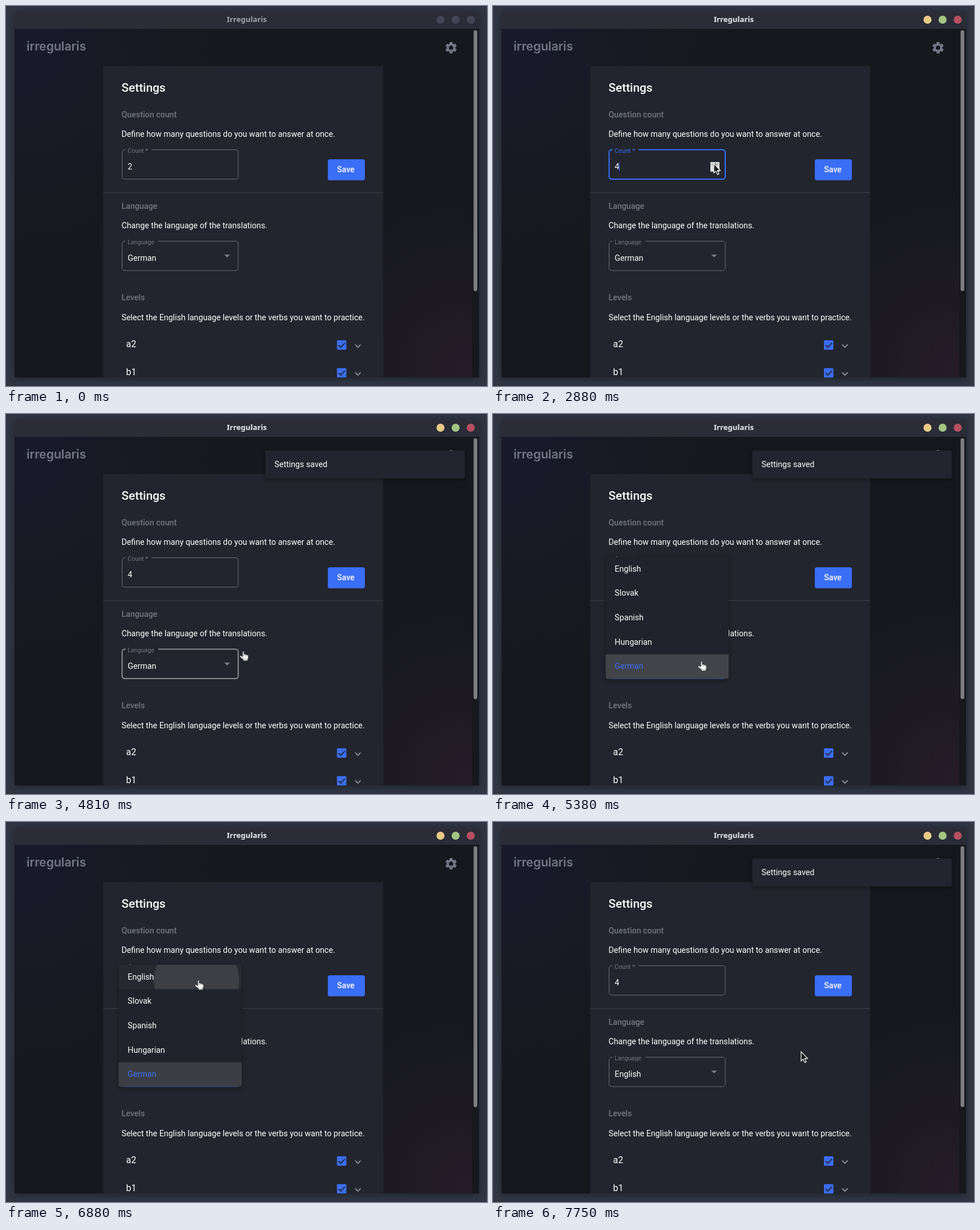
An HTML page that plays this animation: 843x665 px, repeating every 8 s.

```html
<!DOCTYPE html>
<html lang="en">
<head>
<meta charset="utf-8">
<title>Irregularis</title>
<style>
html, body { margin: 0; width: 100%; height: 100%; overflow: hidden; background: #2f3642; }
svg { display: block; width: 843px; height: 665px; font: 14.22px Roboto, sans-serif; fill: #fff; }
.head { font-weight: 500; fill: #737683; }
.small { font-size: 10.67px; fill: #737681; }
.line { fill: none; stroke: #6d7079; }
.thick { fill: none; stroke: #e8e8ea; stroke-width: 2; opacity: 0; }
.level { font-size: 16px; }
.pop { filter: drop-shadow(0 2px 3px rgba(0, 0, 0, .35)); }

/* One loop is 8 s, so 1% is 80 ms. */
.run, .thick { animation: 8s linear infinite; }
.hard { animation: 8s step-end infinite; }

#pointer { animation-name: move; }
@keyframes move {
  0%, 13.6% { transform: translate(291px, 15px); }
  18.75% { transform: translate(365px, 245px); }
  20.375% { transform: translate(378px, 264px); }
  23.5%, 38.4% { transform: translate(387px, 276px); }
  43.75%, 48.75% { transform: translate(588px, 285px); }
  57.9%, 58.75% { transform: translate(422px, 408px); }
  60.1% { transform: translate(414px, 415px); }
  63.75%, 72.75% { transform: translate(363px, 433px); }
  76.6%, 79% { transform: translate(340px, 351px); }
  82.9%, 90.6% { transform: translate(335px, 277px); }
  94.5% { transform: translate(533px, 393px); }
  96.9%, 100% { transform: translate(540px, 402px); }
}
#arrow { animation-name: arrow; }
@keyframes arrow {
  0%, 42.75%, 59.75% { opacity: 0; }
  11.75%, 50.75%, 91.5%, 100% { opacity: 1; }
}
#hand { animation-name: hand; }
@keyframes hand {
  0%, 50.75%, 91.5%, 100% { opacity: 0; }
  42.75%, 59.75% { opacity: 1; }
}

#active { animation-name: activate; }
@keyframes activate { 0%, 25% { opacity: 0; } 27.5%, 100% { opacity: 1; } }

#two { animation-name: two; }
@keyframes two { 0% { opacity: 1; } 25.75%, 100% { opacity: 0; } }
#three { animation-name: three; }
@keyframes three { 0%, 35.125%, 100% { opacity: 0; } 25.75% { opacity: 1; } }
#four { animation-name: four; }
@keyframes four { 0% { opacity: 0; } 35.125%, 100% { opacity: 1; } }
#caret { animation-name: caret; }
@keyframes caret { 0%, 32%, 41.4%, 100% { opacity: 0; } 25.75%, 35.125% { opacity: 1; } }
#spin { animation-name: spin; }
@keyframes spin { 0%, 39.9%, 92.2%, 100% { opacity: 0; } 21.9%, 88.25% { opacity: 1; } }

#countLine { animation-name: countLine; }
@keyframes countLine {
  0%, 18.6% { opacity: 0; stroke: #e8e8ea; }
  20.2%, 25% { opacity: 1; stroke: #e8e8ea; }
  25.75%, 44.5% { opacity: 1; stroke: #3b6ef6; }
  48.25% { opacity: 0; stroke: #3b6ef6; }
  48.3%, 88.25% { opacity: 0; stroke: #e8e8ea; }
  90.6%, 92.2% { opacity: 1; stroke: #e8e8ea; }
  95%, 100% { opacity: 0; stroke: #e8e8ea; }
}
#langLine { animation-name: langLine; }
@keyframes langLine {
  0%, 59.4% { opacity: 0; stroke: #e8e8ea; }
  60.1% { opacity: .4; stroke: #e8e8ea; }
  62%, 64% { opacity: 1; stroke: #e8e8ea; }
  64.8%, 93% { opacity: 1; stroke: #3b6ef6; }
  96.1%, 100% { opacity: 0; stroke: #3b6ef6; }
}
#countLabel { animation-name: countLabel; }
@keyframes countLabel { 0%, 44.5%, 100% { fill: #737681; } 25.75% { fill: #3b6ef6; } }
#langLabel { animation-name: langLabel; }
@keyframes langLabel { 0%, 93%, 100% { fill: #737681; } 64.1% { fill: #3b6ef6; } }

#before { animation-name: before; }
@keyframes before { 0% { opacity: 1; } 87.5%, 100% { opacity: 0; } }
#after { animation-name: after; }
@keyframes after { 0% { opacity: 0; } 87.5%, 100% { opacity: 1; } }

#menu { transform-origin: 305px 441px; animation-name: menu; }
@keyframes menu {
  0%, 64.9% { opacity: 0; transform: scaleY(.8); animation-timing-function: cubic-bezier(0, 0, .2, 1); }
  66.4%, 87.4% { opacity: 1; transform: none; }
  88.6%, 100% { opacity: 0; transform: none; }
}
#hover { animation-name: hover; }
@keyframes hover {
  0% { transform: translateY(171px); }
  73.3% { transform: translateY(128px); }
  75% { transform: translateY(85.3px); }
  80% { transform: translateY(42.7px); }
  82.2%, 100% { transform: none; }
}
#ripple { transform-origin: 334px 277px; animation-name: ripple; }
@keyframes ripple {
  0%, 85.2% { transform: scale(0); }
  86% { transform: scale(.48); animation-timing-function: ease-out; }
  91%, 100% { transform: none; }
}

#toast { transform-origin: 629px 88px; animation-name: toast; }
@keyframes toast {
  0%, 47.75% { opacity: 0; transform: scale(.8); animation-timing-function: cubic-bezier(0, 0, .2, 1); }
  49.6%, 80.25% { opacity: 1; transform: none; }
  81.5% { opacity: 0; transform: none; }
  81.6%, 90.6% { opacity: 0; transform: scale(.8); animation-timing-function: cubic-bezier(0, 0, .2, 1); }
  92.5%, 100% { opacity: 1; transform: none; }
}
</style>
</head>
<body>
<svg viewBox="0 0 843 665">
  <defs>
    <radialGradient id="blue" gradientUnits="userSpaceOnUse" cx="30" cy="80" r="380">
      <stop offset="0" stop-color="#191a2b"/>
      <stop offset="1" stop-color="#191a2b" stop-opacity="0"/>
    </radialGradient>
    <radialGradient id="plum" gradientUnits="userSpaceOnUse" cx="800" cy="630" r="300">
      <stop offset="0" stop-color="#241c29"/>
      <stop offset="1" stop-color="#241c29" stop-opacity="0"/>
    </radialGradient>
    <clipPath id="page"><rect x="15" y="40" width="814" height="610"/></clipPath>
    <clipPath id="option"><path d="M197.500 292.500V254a4 4 0 0 1 4-4H409a4 4 0 0 1 4 4V292.500Z"/></clipPath>
    <path id="box" d="M255 251.500H402.500a4.500 4.500 0 0 1 4.500 4.500V298.500a4.500 4.500 0 0 1-4.500 4.500H208a4.500 4.500 0 0 1-4.500-4.500V256a4.500 4.500 0 0 1 4.500-4.500H209.500"/>
    <path id="wideBox" d="M267 411.500H402.500a4.500 4.500 0 0 1 4.500 4.500V458.500a4.500 4.500 0 0 1-4.500 4.500H208a4.500 4.500 0 0 1-4.500-4.500V416a4.500 4.500 0 0 1 4.500-4.500H209.500"/>
    <g id="row">
      <rect x="580" y="585" width="16.500" height="16.500" rx="1.500" fill="#3b6ef6"/>
      <path d="M583 593.500l3.700 3.700 7.300-7.600" fill="none" stroke="#20232b" stroke-width="1.900"/>
      <path d="M612 592.500l4.800 4.800 4.800-4.800" fill="none" stroke="#868890" stroke-width="2"/>
    </g>
  </defs>

  <rect width="843" height="665" fill="#2f3642"/>
  <g style="filter: drop-shadow(0 2px 6px rgba(0, 0, 0, .35))">
    <path d="M15 650V14a4 4 0 0 1 4-4H825a4 4 0 0 1 4 4V650Z" fill="#2a2d36"/>
  </g>
  <g font-family="Noto Sans, sans-serif" font-size="13.200" font-weight="600" text-anchor="middle">
    <text x="422" y="28.300" fill="#a2a5ad">Irregularis</text>
    <g fill="#444655"><circle cx="761.500" cy="24" r="7"/><circle cx="788" cy="24" r="7"/><circle cx="814.500" cy="24" r="7"/></g>
    <g id="active" class="run">
      <text x="422" y="28.300" fill="#d5d8df">Irregularis</text>
      <circle cx="761.500" cy="24" r="7" fill="#e8c987"/>
      <circle cx="788" cy="24" r="7" fill="#a3c584"/>
      <circle cx="814.500" cy="24" r="7" fill="#b5505f"/>
    </g>
  </g>

  <g clip-path="url(#page)">
    <rect x="15" y="40" width="814" height="610" fill="#15181c"/>
    <rect x="15" y="40" width="802" height="610" fill="url(#blue)"/>
    <rect x="15" y="40" width="802" height="610" fill="url(#plum)"/>
    <rect x="819.500" y="42.500" width="6.500" height="456.500" rx="3.250" fill="#7d7e80"/>
    <text x="36" y="78" font-family="Inter, sans-serif" font-size="21.200" font-weight="600" fill="#737683">irregularis</text>
    <path transform="translate(767.400 60.400) scale(1.050)" fill="#737683" d="M19.140 12.940c.04-.3.060-.610.060-.940 0-.320-.020-.640-.070-.940l2.030-1.580a.49.49 0 0 0 .12-.610l-1.920-3.320a.488.488 0 0 0-.59-.220l-2.390.960a7 7 0 0 0-1.620-.940l-.36-2.540A.484.484 0 0 0 13.920 2.400h-3.840a.48.48 0 0 0-.47.410l-.36 2.540c-.59.240-1.130.570-1.620.940l-2.390-.960a.48.48 0 0 0-.59.220L2.740 8.870a.47.47 0 0 0 .12.610l2.030 1.580c-.05.3-.09.630-.09.940s.02.640.07.940l-2.030 1.580a.49.49 0 0 0-.12.610l1.920 3.320c.12.220.37.290.59.220l2.390-.960c.5.380 1.030.7 1.620.940l.36 2.540c.05.240.24.410.48.410h3.840c.24 0 .44-.17.470-.410l.36-2.540a7 7 0 0 0 1.620-.940l2.390.960c.22.080.47 0 .59-.220l1.920-3.320a.47.47 0 0 0-.12-.610ZM12 15.600a3.600 3.600 0 1 1 0-7.200 3.600 3.600 0 0 1 0 7.200Z"/>

    <rect x="170.500" y="105" width="490.700" height="560" rx="3.500" fill="#22252d"/>
    <path d="M170.500 326.300H661" stroke="#3e4149"/>
    <text x="202.500" y="150.300" font-size="20.800" font-weight="500">Settings</text>
    <text class="head" x="202.500" y="195">Question count</text>
    <text x="202.500" y="229.400">Define how many questions do you want to answer at once.</text>
    <text class="head" x="202.500" y="355">Language</text>
    <text x="202.500" y="389.400">Change the language of the translations.</text>
    <text class="head" x="202.500" y="515.400">Levels</text>
    <text x="202.500" y="550">Select the English language levels or the verbs you want to practice.</text>

    <use href="#box" class="line"/>
    <use href="#box" class="thick" id="countLine"/>
    <text class="small hard" id="countLabel" x="213.300" y="257">Count *</text>
    <text class="hard" id="two" x="213.300" y="286.400">2</text>
    <text class="hard" id="three" x="213.300" y="286.400">3</text>
    <text class="hard" id="four" x="213.300" y="286.400">4</text>
    <rect class="hard" id="caret" x="221" y="274" width="1" height="15" fill="#3b6ef6"/>
    <g class="hard" id="spin">
      <rect x="381" y="273" width="16" height="17" fill="#e6e6e6"/>
      <rect x="381" y="273" width="16" height="8.500" fill="#d2d2d2"/>
      <path d="M386 279l3-3 3 3M386 284l3 3 3-3" fill="none" stroke="#55575c" stroke-width="1.500"/>
    </g>
    <rect x="564" y="268.300" width="65" height="36.700" rx="3.500" fill="#3b6ef6"/>
    <text x="595.600" y="291.300" font-weight="500" text-anchor="middle">Save</text>

    <use href="#wideBox" class="line"/>
    <use href="#wideBox" class="thick" id="langLine"/>
    <text class="small hard" id="langLabel" x="213.300" y="417">Language</text>
    <text class="hard" id="before" x="213.300" y="446.400">German</text>
    <text class="hard" id="after" x="213.300" y="446.400">English</text>
    <path d="M382.500 435h10l-5 5Z" fill="#7b7e87"/>

    <text class="level" x="210.500" y="597.300">a2</text>
    <text class="level" x="210.500" y="646.200">b1</text>
    <use href="#row"/>
    <use href="#row" y="48.700"/>

    <g id="menu" class="run">
      <rect class="pop" x="197.500" y="250" width="215.500" height="213.300" rx="4" fill="#20232b"/>
      <path d="M197.500 420.600H413V459.300a4 4 0 0 1-4 4H201.500a4 4 0 0 1-4-4Z" fill="#3c3e45"/>
      <rect id="hover" class="hard" x="197.500" y="250" width="215.500" height="42.600" rx="2" opacity=".030"/>
      <g clip-path="url(#option)"><circle id="ripple" class="run" cx="334" cy="277" r="155" fill="#3d3f44"/></g>
      <text x="213.300" y="275.600">English</text>
      <text x="213.300" y="318.300">Slovak</text>
      <text x="213.300" y="361">Spanish</text>
      <text x="213.300" y="403.700">Hungarian</text>
      <text x="213.300" y="446.400" fill="#3b6ef6">German</text>
    </g>

    <g id="toast" class="run">
      <rect class="pop" x="454.500" y="64" width="349.700" height="48.800" rx="3.500" fill="#22252d"/>
      <text x="470.500" y="93.300">Settings saved</text>
    </g>
  </g>

  <g id="pointer" class="run">
    <path id="arrow" class="hard" d="M0 0V16.300L3.700 12.900 6.400 18.900 9 17.800 6.400 11.900H11.400Z" fill="#16181c" stroke="#fff" stroke-width="1.200"/>
    <g id="hand" class="hard">
      <path d="M1.200 1.200C1.200-.4 3.600-.4 3.600 1.200V5.600C4.500 4.800 5.800 5 6.200 6 7 5.400 8.200 5.600 8.600 6.600 9.600 6.200 11 6.600 11 8V12.500L10 14V16.500H2.200V14.200L-3.400 9.800C-4.400 8.600-3 7.200-1.700 8L1.200 9.700Z" stroke="#1a1c20" stroke-width=".6"/>
      <path d="M3.700 6v3M6.200 6.300v2.700M8.600 7v2M2.500 13.800h7.500" fill="none" stroke="#55585f" stroke-width=".6"/>
    </g>
  </g>
</svg>
</body>
</html>
```
